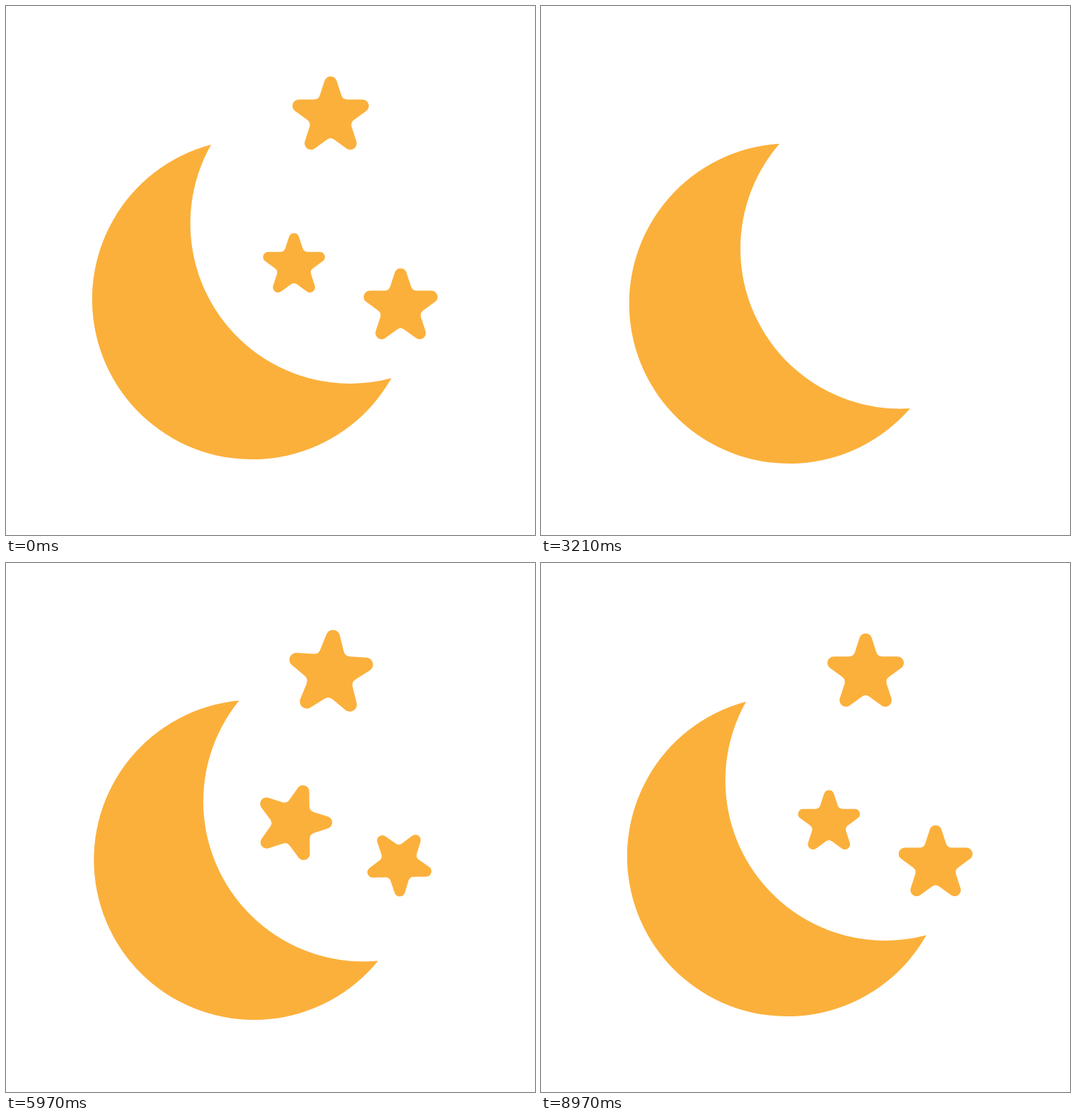
These frames come from a looping animation (748x748 px, 9 s). An HTML page with a canvas:

```html
<!DOCTYPE html>
<html lang="en">
<head>
<meta charset="utf-8">
<title>Moon and stars</title>
<style>
  html, body { margin: 0; width: 100%; height: 100%; overflow: hidden; background: #fff; }
  canvas { display: block; }
</style>
</head>
<body>
<canvas id="stage" width="748" height="748"></canvas>
<script>
const ctx = document.getElementById('stage').getContext('2d');
const LOOP = 9000, STEP = 30, RAD = Math.PI / 180;

const stars = [
  { x: 558, y: 421.5, size: 0.968, duration: 655 },
  { x: 407.2, y: 363.5, size: 0.81, duration: 750 },
  { x: 459, y: 151.8, size: 1, duration: 750 }
];

// Each phase hides or shows the stars, with one delay per star.
const phases = [
  { start: 900, hide: true, delays: [0, 83, 243] },
  { start: 3120, hide: false, delays: [139, 170, 310] },
  { start: 5580, hide: true, delays: [0, 83, 243] },
  { start: 7800, hide: false, delays: [208, 272, 430] }
];

const clamp = v => Math.min(1, Math.max(0, v));
const easeOut = p => 1 - (1 - p) ** 2;
const easeInOut = p => p < 0.5 ? 2 * p * p : 1 - 2 * (1 - p) ** 2;

function makeStar() {
  const path = new Path2D(), outer = 76.4, round = 9, drop = 4.05;
  const point = i => {
    const r = i % 2 ? outer * 0.382 : outer;
    return [r * Math.sin(i * 36 * RAD), drop - r * Math.cos(i * 36 * RAD)];
  };
  const [ax, ay] = point(0), [bx, by] = point(1);
  // Start on an edge between the rounded tip and the rounded inner corner.
  path.moveTo(ax * 0.3 + bx * 0.7, ay * 0.3 + by * 0.7);
  for (let i = 1; i <= 10; i++) path.arcTo(...point(i), ...point(i + 1), round);
  path.closePath();
  return path;
}

function makeMoon() {
  const path = new Path2D(), r = 226.3, tilt = -37.65 * RAD, gap = 87.7;
  const half = Math.acos(gap / r);
  const dx = gap * Math.cos(tilt), dy = gap * Math.sin(tilt);
  path.arc(417.5 - dx, 361.2 - dy, r, tilt + half, tilt - half + 2 * Math.PI);
  path.arc(417.5 + dx, 361.2 + dy, r, tilt + Math.PI + half, tilt + Math.PI - half, true);
  path.closePath();
  return path;
}

const starPath = makeStar(), moonPath = makeMoon();

function drawMoon(turn) {
  ctx.save();
  ctx.translate(319.5, 432.2);
  ctx.rotate(14.06 * RAD * turn);
  ctx.translate(-319.5, -432.2);
  ctx.fill(moonPath);
  ctx.restore();
}

function drawStar({ x, y, size }, gone) {
  const scale = size * (1 - gone) * (1 + 2.45 * gone);
  if (scale <= 0) return;
  ctx.save();
  ctx.translate(x, y);
  ctx.rotate(52 * RAD * gone);
  ctx.scale(scale, scale);
  ctx.fill(starPath);
  ctx.restore();
}

function draw(time) {
  const t = Math.floor(time % LOOP / STEP) * STEP;
  const phase = phases.findLast(p => p.start <= t) || phases[phases.length - 1];
  const elapsed = (t - phase.start + LOOP) % LOOP;
  const away = p => phase.hide ? p : 1 - p;

  ctx.fillStyle = '#fff';
  ctx.fillRect(0, 0, 748, 748);
  ctx.fillStyle = '#fbb03b';
  drawMoon(away(easeOut(clamp(elapsed / 900))));
  stars.forEach((star, i) =>
    drawStar(star, away(easeInOut(clamp((elapsed - phase.delays[i]) / star.duration)))));
}

const begin = performance.now();
function tick() {
  draw(performance.now() - begin);
  requestAnimationFrame(tick);
}
tick();
</script>
</body>
</html>
```
